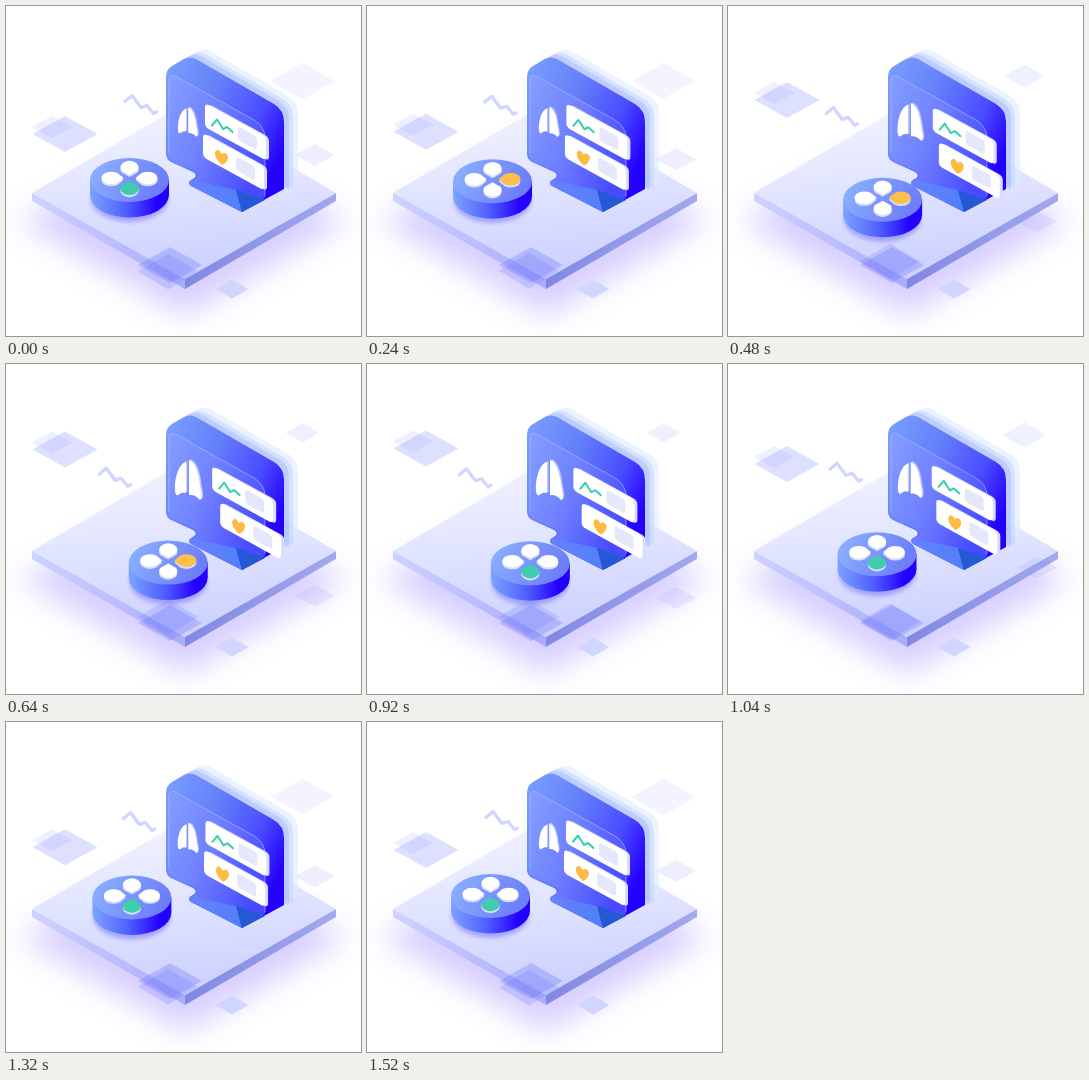
Write an HTML page that moves like this. It is 355x330 px and loops after 3.8 s.

```html
<!DOCTYPE html>
<html lang="en">
<head>
<meta charset="utf-8">
<style>
html, body { margin: 0; width: 100%; height: 100%; overflow: hidden; background: #fff; }
svg { display: block; width: 355px; height: 330px; }
</style>
</head>
<body>
<svg viewBox="0 0 355 330">
  <defs>
    <linearGradient id="top" x1=".4" y1="0" x2=".55" y2="1">
      <stop stop-color="#f1f3ff"/><stop offset=".5" stop-color="#e0e3ff"/><stop offset="1" stop-color="#cacfff"/>
    </linearGradient>
    <linearGradient id="edgeL"><stop stop-color="#cdd2ff"/><stop offset="1" stop-color="#a9adfa"/></linearGradient>
    <linearGradient id="edgeR"><stop stop-color="#8188e3"/><stop offset="1" stop-color="#a2a9ee"/></linearGradient>
    <linearGradient id="body" x1="0" y1="0" x2="1" y2=".6">
      <stop stop-color="#7ba0ff"/><stop offset=".4" stop-color="#6480fa"/><stop offset=".75" stop-color="#4a4cff"/><stop offset="1" stop-color="#2400ff"/>
    </linearGradient>
    <linearGradient id="face" x1="0" y1="0" x2="1" y2=".6">
      <stop stop-color="#859fff"/><stop offset=".5" stop-color="#6f80ff"/><stop offset="1" stop-color="#474aff"/>
    </linearGradient>
    <linearGradient id="side"><stop stop-color="#7ba4ff"/><stop offset=".45" stop-color="#5060ff"/><stop offset=".85" stop-color="#2400ff"/></linearGradient>
    <linearGradient id="lid" x1="0" y1="0" x2="1" y2=".3"><stop stop-color="#8db4ff"/><stop offset="1" stop-color="#6d7efa"/></linearGradient>
    <linearGradient id="foot"><stop stop-color="#6a80ff"/><stop offset="1" stop-color="#5080f8"/></linearGradient>
    <filter id="blur" x="-30%" y="-40%" width="160%" height="180%"><feGaussianBlur stdDeviation="15"/></filter>
    <filter id="soft" x="-30%" y="-30%" width="160%" height="160%"><feGaussianBlur stdDeviation="2"/></filter>
    <path id="shell" d="M160 72Q160 63 166 60L178 53Q184 50 190 53L268 98Q278 104 278 116V183L236 206L185 180Q181 177 185 174L189 171.500Q191 168 187 166L165 156Q160 153 160 148Z"/>
    <path id="slab" d="M160 72Q160 63 166 60L178 53Q184 50 190 53L268 98Q278 104 278 116V186L160 146Z"/>
    <path id="lungs" d="M-2-18C-9-16-13-3-13 8Q-13 16-10 15Q-6 11-2 13ZM1-20C8-17 11-5 12 6Q15 18 12 20Q7 14 1 15Z"/>
    <path id="petalV" d="M0-3L8-7.500Q11-12 6-15.500Q0-19 -6-15.500Q-11-12-8-7.500Z"/>
    <path id="petalH" d="M6 0L12-5Q20-8 26-4Q30 0 26 4Q20 8 12 5Z"/>
    <g id="card">
      <rect x="3" y="-1" width="61" height="24" rx="4" fill="#d8ddff"/>
      <rect width="61" height="24" rx="4" fill="#fff"/>
      <rect x="33" y="5" width="19" height="14" rx="3" fill="#e5e8fd"/>
    </g>
  </defs>

  <path d="M14 215L179 130L341 215L179 310Z" fill="#a08cff" opacity=".42" filter="url(#blur)"/>
  <path id="left" fill="#8a93ff" fill-opacity=".29"/>
  <path id="leftSmall" fill="#8a93ff" fill-opacity=".15"/>
  <path id="far" fill="#9ba6ff"/>

  <path d="M26 187L179 273V283L26 195Z" fill="url(#edgeL)"/>
  <path d="M330 187L179 273V283L330 195Z" fill="url(#edgeR)"/>
  <path d="M26 187L178 98L330 187L179 273Z" fill="url(#top)"/>
  <path id="near" fill="#8a90ff" fill-opacity=".15"/>

  <use href="#slab" x="14" y="-8" fill="#dcecff" opacity=".6"/>
  <use href="#slab" x="9" y="-5" fill="#b8ccff" opacity=".45"/>
  <use href="#slab" x="5" y="-3" fill="#98acff" opacity=".4"/>
  <use href="#shell" fill="url(#body)"/>
  <path d="M162 76Q162 66 170 70L248 114Q259 121 259 132V192L236 204L187 179Q183 177 187 174L191 171.500Q193 168 188 165L167 155Q162 152 162 147Z" fill="url(#face)"/>
  <path d="M163 147V76Q163 66 171 71L248 114Q259 121 259 132V190" fill="none" stroke="#a9b8ff" stroke-opacity=".65"/>
  <path d="M185 174L230 184L236 206L185 180Q181 177 185 174Z" fill="url(#foot)"/>
  <path d="M230 184L259 194L236 206Z" fill="#2458d4"/>

  <g id="lung"><use href="#lungs" x="1.5" y="-.8" fill="#c3ccfa"/><use href="#lungs" fill="#fff"/></g>
  <g id="chart">
    <use href="#card" transform="matrix(1 .55 0 1 199 97)"/>
    <path d="M206 119.500L211 113.500L217 123L221 121L226.500 126" fill="none" stroke="#35cfaa" stroke-width="2" stroke-linecap="round" stroke-linejoin="round"/>
  </g>
  <g id="pulse">
    <use href="#card" transform="matrix(1 .55 0 1 197 127)"/>
    <path d="M216 159Q208 152 209 146Q212 141 215.500 148Q220 145 222 151Q222 156 216 159Z" fill="#fdbb42"/>
  </g>

  <path id="wave" d="M119 95.500L126 89.500L135 101.500L141 99.500L147.500 107.500L150.500 106" fill="none" stroke="#d0d6ff" stroke-width="3.300" stroke-linecap="round" stroke-linejoin="round"/>

  <g id="disk">
    <ellipse cy="20" rx="38.500" ry="22" fill="#6f6cf0" opacity=".5" filter="url(#soft)"/>
    <path d="M-39.500 0V15A39.500 22.500 0 0 0 39.500 15V0Z" fill="url(#side)"/>
    <ellipse rx="39.500" ry="22" fill="url(#lid)"/>
    <g id="petals" transform="translate(0 -2)"></g>
  </g>

  <path id="baseA" fill="#6a72f8" fill-opacity=".3"/>
  <path id="baseB" fill="#6a72f8" fill-opacity=".22"/>
  <path id="chip" fill="#d1d6ff"/>
</svg>
<script>
const LOOP = 3800, STEP = 40, MOVE = 600, OUT = 200, BACK = 900;
const $ = id => document.getElementById(id);

// cubic-bezier(.25, .1, .25, 1)
function ease(x) {
  if (x <= 0) return 0;
  if (x >= 1) return 1;
  const curve = (a, b, u) => 3 * a * u * (1 - u) ** 2 + 3 * b * u * u * (1 - u) + u ** 3;
  let lo = 0, hi = 1;
  for (let i = 0; i < 24; i++) {
    const mid = (lo + hi) / 2;
    if (curve(.25, .25, mid) < x) lo = mid; else hi = mid;
  }
  return curve(.1, 1, lo);
}

const diamond = (id, x, y, w, h) =>
  $(id).setAttribute('d', `M${x - w} ${y}L${x} ${y - h}L${x + w} ${y}L${x} ${y + h}Z`);
const place = (id, x, y, s = 1) =>
  $(id).setAttribute('transform', `translate(${x} ${y}) scale(${s})`);

const petal = (id, shape, flip) =>
  `<use href="#${shape}" transform="translate(0 2) scale(${flip})" fill="#d9def9"/>` +
  `<use id="${id}" href="#${shape}" transform="scale(${flip})" fill="#fff"/>`;
$('petals').innerHTML = petal('up', 'petalV', '1 1') + petal('west', 'petalH', '-1 1') +
  petal('east', 'petalH', '1 1') + petal('down', 'petalV', '1 -1');

diamond('baseA', 164, 259, 32, 18);
diamond('chip', 226, 283, 16.5, 9.5);

function draw(t) {
  const p = t < BACK ? ease((t - OUT) / MOVE) : 1 - ease((t - BACK) / MOVE);
  const active = t > OUT && t < BACK;

  place('disk', 123.5 + 40.6 * p, 174 + 25.8 * p);
  $('east').setAttribute('fill', active ? '#fdc04a' : '#fff');
  $('down').setAttribute('fill', active ? '#fff' : '#40cdae');

  place('lung', 181.5 + .5 * p, 116, .74 + .28 * p);
  place('chart', 7.5 * p, 5.3 * p);
  place('pulse', 18 * p, 11.6 * p);
  place('wave', -27 * p, 15.5 * p);

  const y = 128 - 44.4 * p;
  diamond('left', 59, y, 32.5, 18);
  diamond('leftSmall', 46, y - 7, 20, 11);
  diamond('far', 296.5, 75 - 6.4 * p, 32 - 16 * p, 18.5 - 9 * p);
  $('far').setAttribute('fill-opacity', .12 + .05 * p);
  diamond('near', 309, 149 + 86.6 * p, 20, 11);
  diamond('baseB', 162, 265.5 - 13 * p, 30, 18);
}

const start = performance.now();
function tick() {
  const t = (performance.now() - start) % LOOP;
  draw(Math.floor(t / STEP) * STEP);
  requestAnimationFrame(tick);
}
tick();
</script>
</body>
</html>
```
